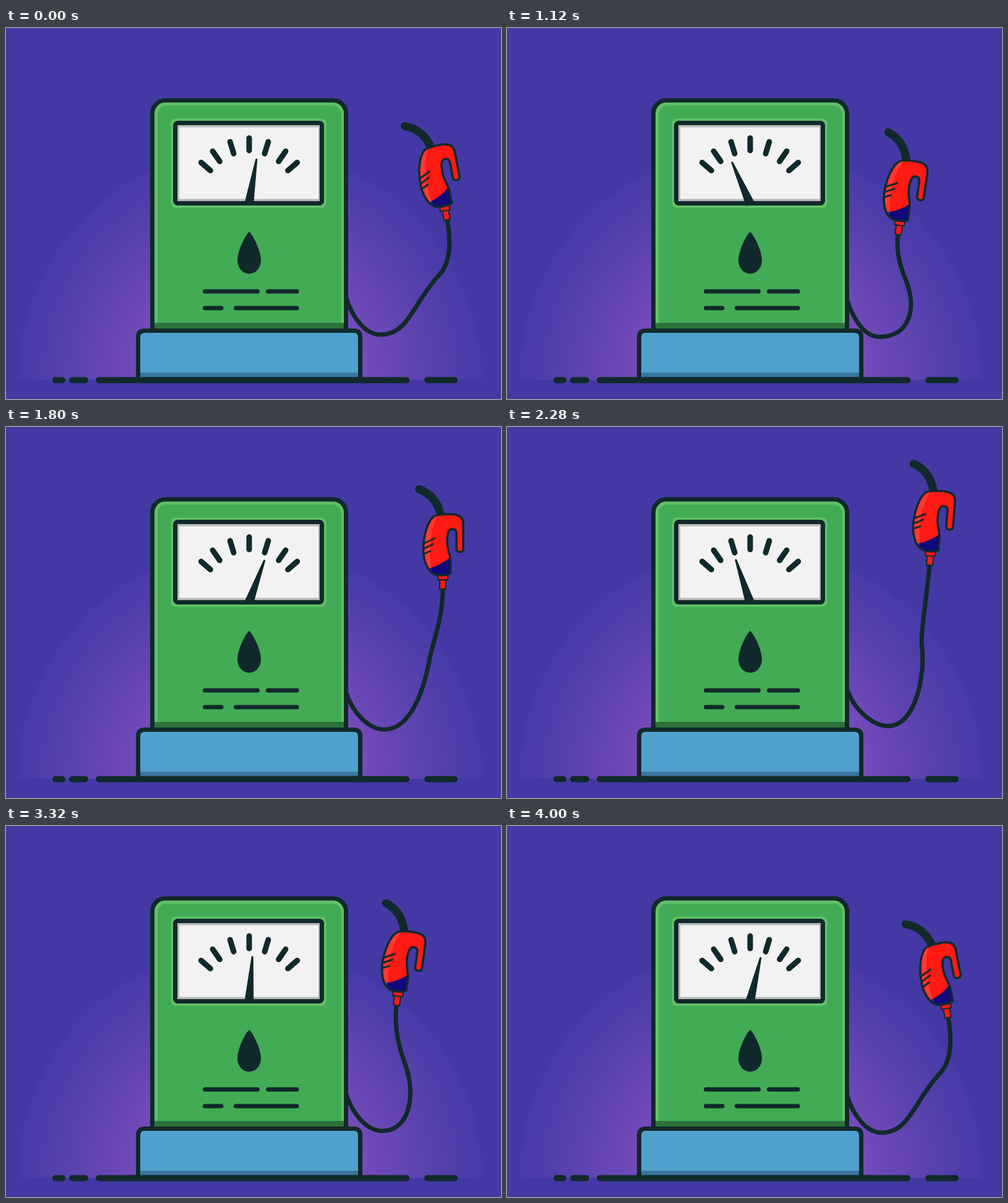
Write an HTML page that moves like this. It is 800 px wide and 600 px high and loops after 4040 ms.

```html
<!DOCTYPE html>
<html lang="en">
<head>
<meta charset="utf-8">
<title>Fuel pump</title>
<style>
html, body { margin: 0; width: 100%; height: 100%; overflow: hidden; background: #4439a4; }
svg { display: block; width: 800px; height: 600px; }
.line { fill: none; stroke: #10292a; stroke-width: 7; stroke-linecap: round; stroke-linejoin: round; }
.ink { fill: #10292a; }
.light { fill: #62c068; }
.red { fill: #ff1a14; }
</style>
</head>
<body>
<svg viewBox="0 0 800 600">
  <defs>
    <radialGradient id="glow" gradientUnits="userSpaceOnUse" cx="394.5" cy="569" r="375">
      <stop offset="0" stop-color="#8a50c4"/>
      <stop offset=".5" stop-color="#744aba"/>
      <stop offset=".75" stop-color="#5b42af"/>
      <stop offset="1" stop-color="#473ba7"/>
    </radialGradient>
    <path id="body" d="M691 145Q696 141 718 141Q739 141 739 156V197Q739 202 733.5 202Q728 202 728 197V172Q728 165 721 165Q713 165 713 185C713 198 718 206 718.5 216V237Q706 242 692 238C680 232 675 215 674.5 200C674 176 682 152 691 145Z"/>
    <clipPath id="bodyClip"><use href="#body"/></clipPath>
    <path id="drop" d="M-8 0C-3 -2 0 -5 3 -5A5 5 0 0 1 3 5C0 5 -3 2 -8 0Z" fill="#ee8b38"/>
  </defs>

  <path d="M19.5 569A375 375 0 0 1 769.5 569Z" fill="url(#glow)"/>
  <path id="hose" class="line"/>

  <!-- cabinet -->
  <rect class="light" x="236.5" y="117" width="313" height="380" rx="21"/>
  <rect x="245" y="125.5" width="297" height="365" rx="14" fill="#43ab55"/>
  <rect x="238" y="477" width="310" height="14" fill="#2d713a"/>
  <rect class="line" x="236.5" y="117" width="313" height="390" rx="21"/>

  <!-- gauge -->
  <rect class="light" x="266.5" y="146.5" width="251" height="144.5" rx="8"/>
  <rect x="274" y="154" width="237" height="129" fill="#b7b7b7"/>
  <rect x="280" y="160.5" width="225" height="116" fill="#f2f2f2"/>
  <path id="ticks" class="line" style="stroke-width:9"/>
  <path id="needle" class="ink" d="M-1.5 -73Q0 -75 1.5 -73L7.5 1H-7.5Z"/>
  <rect class="line" x="273.5" y="153.5" width="237" height="130" rx="4"/>

  <path class="ink" d="M393 330C396 330 412 358 412 376A19 21.5 0 0 1 374 376C374 358 390 330 393 330Z"/>
  <path class="line" d="M321.5 426H406.5M423.5 426H470M321.5 453H348M371.5 453H470"/>

  <!-- plinth and ground -->
  <rect x="213.5" y="489.5" width="359" height="80" rx="11" fill="#50a0cd"/>
  <rect x="215" y="557.5" width="356" height="11" fill="#39759f"/>
  <path class="line" d="M213.5 569V500Q213.5 489.5 224 489.5H562Q572.5 489.5 572.5 500V569"/>
  <path class="line" style="stroke-width:10" d="M80 569.5H91M107 569.5H128M150 569.5H647M681 569.5H725"/>

  <use class="drop" href="#drop"/>
  <use class="drop" href="#drop"/>

  <!-- nozzle, hung from the point where the hose joins -->
  <g id="nozzle">
    <path class="line" style="stroke-width:13" d="M667.5 100.5C686 107 698 122 703 143"/>
    <rect class="red" x="701" y="246" width="10" height="16" stroke="#10292a" stroke-width="2"/>
    <rect class="red" x="698" y="240" width="16" height="7" stroke="#10292a" stroke-width="2"/>
    <use href="#body" class="red"/>
    <g clip-path="url(#bodyClip)">
      <path d="M670 231Q700 228 722 207V246H670Z" fill="#10087c"/>
      <path d="M670 140H700Q677 175 690 246H670Z" fill="#fff" opacity=".13"/>
    </g>
    <use href="#body" class="line" style="stroke-width:3.5"/>
    <path class="line" style="stroke-width:3" d="M676 188L693 180M675 197L690 189.5M676 205L686 200.5"/>
  </g>
</svg>
<script>
const LOOP = 4040, FRAME = 40, DEG = Math.PI / 180;
const $ = id => document.getElementById(id);
const drops = document.querySelectorAll('.drop');

// time, nozzle x, y, tilt, needle angle
const keys = [
  [0, 713, 310, -11, 9.5],
  [480, 685, 351, -2, -3.5],
  [1120, 632, 334, 8, -23.5],
  [1800, 706, 262, 0, 20],
  [2240, 687, 224, 4, -17],
  [2720, 623, 242, 11.4, -16],
  [3320, 631, 290, 7.6, 4.3],
  [4000, 713, 310, -11, 13.5]
];

// Smooth curve through the keys, held after the last one
function sample(t) {
  const last = keys.length - 1;
  t = Math.min(t, keys[last][0]);
  const i = Math.max(0, keys.findIndex(k => k[0] >= t) - 1);
  const from = keys[i], to = keys[i + 1];
  const tangent = (k, c) => {
    const a = keys[Math.max(0, k - 1)], b = keys[Math.min(last, k + 1)];
    return (b[c] - a[c]) / (b[0] - a[0]);
  };
  const span = to[0] - from[0], u = (t - from[0]) / span;
  return [1, 2, 3, 4].map(c => from[c] + (to[c] - from[c]) * u * u * (3 - 2 * u)
    + span * u * (1 - u) * ((1 - u) * tangent(i, c) - u * tangent(i + 1, c)));
}

// The hose sags to a low point, then bends up towards the nozzle and follows its tilt
function drawHose(x, y, tilt) {
  const lowX = 607 - 0.12 * (y - 298), lowY = 452 + 0.142 * y;
  const bendX = 685 + 0.4 * (x - 706) - 1.2 * tilt, bendY = 234 + 0.53 * y;
  const dx = 4 - 1.6 * tilt, dy = -23;
  const reach = 0.42 * Math.hypot(x - bendX, y - bendY);
  $('hose').setAttribute('d', `M549 ${lowY - 62}C560 ${lowY - 26} ${lowX - 24} ${lowY} ${lowX} ${lowY}`
    + `C${lowX + 45} ${lowY} ${bendX - 2 * dx} ${bendY - 2 * dy} ${bendX} ${bendY}`
    + `C${bendX + 0.75 * dx} ${bendY + 0.75 * dy} ${x - reach * Math.sin(tilt * DEG)} ${y + reach * Math.cos(tilt * DEG)} ${x} ${y}`);
}

// A drop flies left out of the spout in an arc and fades
function drawDrop(el, u) {
  const visible = u > 0 && u < 1;
  el.setAttribute('opacity', visible ? Math.min(1, 3 * (1 - u)) : 0);
  const x = 640 - 112 * u + 32 * u * u, y = 188 - 133 * u + 168 * u * u;
  const turn = Math.atan2(336 * u - 178, 64 * u - 112) / DEG;
  el.setAttribute('transform', `translate(${x} ${y}) rotate(${turn})`);
}

function draw(t) {
  const [x, y, tilt, needle] = sample(t);
  $('nozzle').setAttribute('transform', `translate(${x} ${y}) rotate(${tilt}) translate(-706 -262)`);
  $('needle').setAttribute('transform', `translate(392.8 284) rotate(${needle})`);
  drawHose(x, y, tilt);
  drops.forEach((el, i) => drawDrop(el, (t - 60 - 200 * i) / 500));
}

$('ticks').setAttribute('d', [-49, -34.5, -17, 0, 17, 34.5, 49].map(angle => {
  const r = 107 - Math.abs(angle) / 12;
  const point = d => `${393 + d * Math.sin(angle * DEG)} ${285 - d * Math.cos(angle * DEG)}`;
  return `M${point(r)}L${point(r - 20)}`;
}).join(''));

const start = performance.now();
function tick() {
  const t = (performance.now() - start) % LOOP;
  draw(Math.floor(t / FRAME) * FRAME);
  requestAnimationFrame(tick);
}
tick();
</script>
</body>
</html>
```
